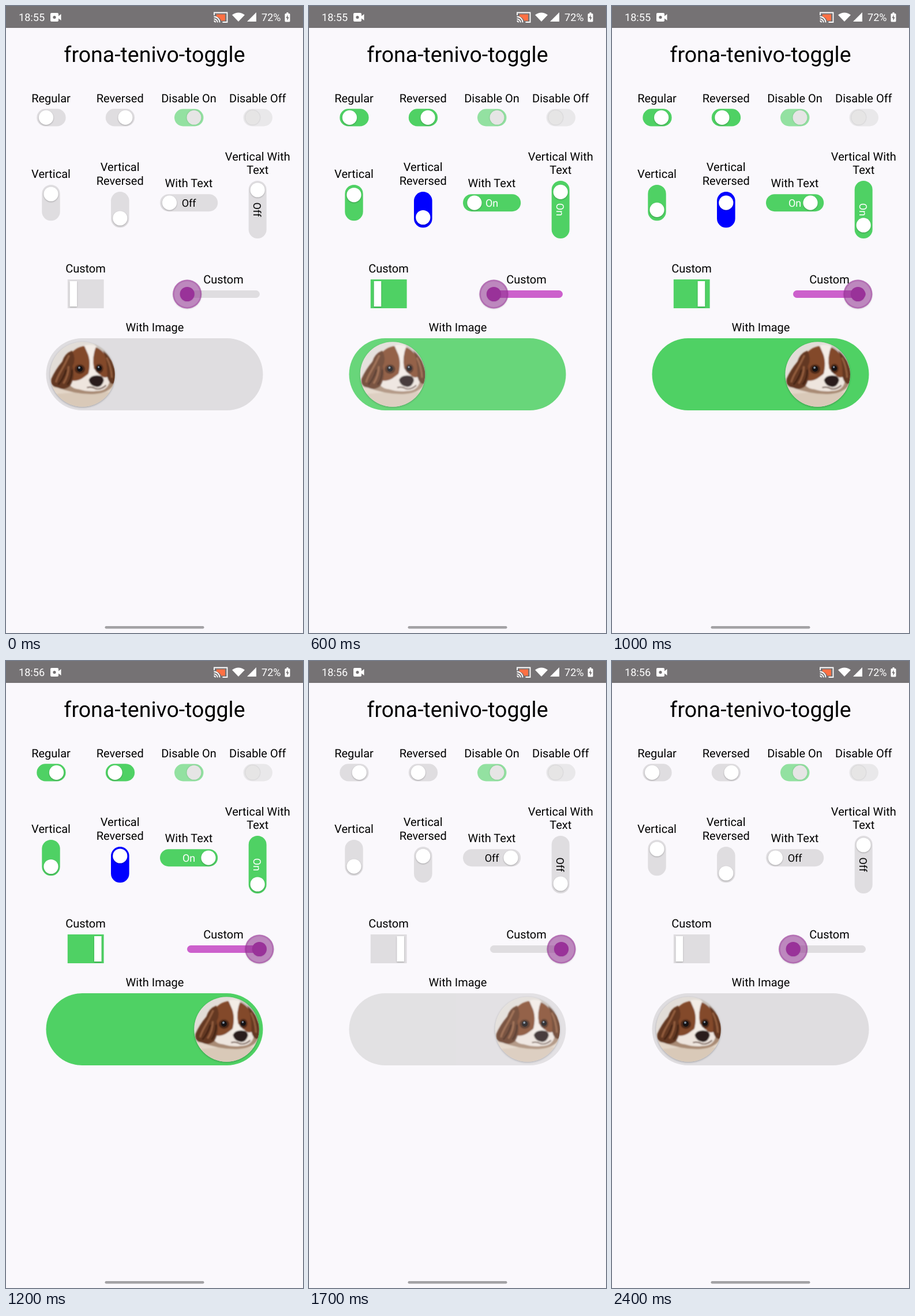
An HTML page for the animation above (3600 ms loop, 515 px wide and 1087 px high).

```html
<!DOCTYPE html>
<html lang="en">
<head>
<meta charset="utf-8">
<title>Switch gallery</title>
<style>
html, body { margin: 0; width: 100%; height: 100%; overflow: hidden; background: #faf8fc; }
svg { display: block; width: 100%; height: 100%; }
text { font: 20px Roboto, "Noto Sans", sans-serif; text-anchor: middle; text-rendering: geometricPrecision; }
.bar { font-size: 18.1px; fill: #fff; text-anchor: start; }
.state { font-size: 18px; }
.track { fill: var(--track); }
.thumb { fill: #fff; filter: drop-shadow(0 1px 1px #0004); }
.off { --track: #dfdde0; --slide: #dfdde0; --blue: #dfdde0; --ink: #000; }
.on { --track: #4fd164; --slide: #cc60cc; --blue: #00f; --ink: #fff; }
.state { fill: var(--ink); }
</style>
</head>
<body>
<svg id="stage" class="off" viewBox="0 0 515 1087">
  <defs>
    <clipPath id="round"><circle r="56.3"/></clipPath>
    <filter id="soft" x="-10%" y="-10%" width="120%" height="120%"><feGaussianBlur stdDeviation=".9"/></filter>
  </defs>

  <!-- status bar -->
  <rect width="515" height="38" fill="#757274"/>
  <text id="clock" class="bar" x="22" y="26"></text>
  <text class="bar" x="443" y="26">72%</text>
  <g fill="#fff">
    <path d="M79 12h10q2 0 2 2v3.500l4.500-3.500v11l-4.500-3.500v3.500q0 2-2 2h-10q-2 0-2-2v-11q0-2 2-2z"/>
    <circle cx="84" cy="19.500" r="2.600" fill="#757274"/>
    <path d="M392 15.500Q403 7.500 414 15.500L403 27z"/>
    <path d="M434 11v16h-16z"/>
    <path d="M485 13h1.500v-2h3v2h1.500q1.500 0 1.500 1.500v11.500q0 1.500-1.500 1.500h-6q-1.500 0-1.500-1.500v-11.500q0-1.500 1.500-1.500z"/>
    <path d="M488.500 15l-3 6h2v4.500l3.200-6h-2.200z" fill="#757274"/>
  </g>
  <path d="M365 14.500h15v11h-7q-2-6-8-7z" fill="#ff7043"/>
  <g fill="none" stroke="#fff" stroke-width="1.800">
    <path d="M361 16v-4.500h22.500v16.500h-8"/>
    <path d="M360.500 18.500a10 10 0 0 1 10 10M360.500 22.300a6.200 6.200 0 0 1 6.200 6.200"/>
    <path d="M360.500 26a2.500 2.500 0 0 1 2.500 2.500"/>
  </g>

  <text x="257.500" y="96.500" style="font-size:37.500px">frona-tenivo-toggle</text>
  <g id="labels"></g>
  <g id="switches"></g>

  <!-- disabled pair -->
  <rect x="292" y="178.500" width="50.500" height="30" rx="15" fill="#93e1a1"/>
  <rect x="411.500" y="178.500" width="50.500" height="30" rx="15" fill="#e9e8ea"/>
  <g fill="#e6e5e5" style="filter:drop-shadow(0 .5px .8px #0003)">
    <circle cx="326" cy="193.300" r="12.500"/><circle cx="427.700" cy="193.300" r="12.500"/>
  </g>

  <!-- slider -->
  <rect x="314" y="493" width="126" height="13" rx="6.500" fill="var(--slide)"/>
  <g id="knob" style="filter:drop-shadow(0 1px 1px #0003)">
    <circle r="25" fill="#993299" fill-opacity=".5"/>
    <circle r="23.700" fill="none" stroke="#993299" stroke-opacity=".3" stroke-width="2.600"/>
    <circle r="12.600" fill="#993299"/>
  </g>

  <!-- picture switch -->
  <g id="wide">
    <rect class="track" x="69.500" y="576" width="376" height="125" rx="62.500"/>
    <g id="photo" style="filter:drop-shadow(0 1.500px 1.500px #0004)">
      <g clip-path="url(#round)">
        <circle r="57" fill="#e2ddd8"/>
        <g filter="url(#soft)">
          <path d="M16-60h46v38l-30-14z" fill="#cbc4be"/>
          <path d="M-60 20Q0 12 60 16V60H-60z" fill="#e3d6c8"/>
          <path d="M-60 36Q0 28 60 32V60H-60z" fill="#d9c9b8"/>
          <!-- shadow under the chin, then white muzzle and cheeks -->
          <path d="M-46 22Q-10 36 22 34Q46 32 54 18L40 8H-30z" fill="#a98b74"/>
          <path d="M-26 4Q-26 24-6 26Q10 31 24 29Q43 29 47 13L36-8H-10z" fill="#eee5de"/>
          <!-- crown, eye patches and blaze -->
          <path d="M-24-30Q-14-47 4-49Q28-51 39-34Q49-16 45 4Q37 8 31 1L17-6L4 4Q-8 14-22 10z" fill="#83492c"/>
          <path d="M3-50Q14-53 24-49Q16-30 20-10L31 3L8 7Q16-16 10-34z" fill="#f3ece6"/>
          <!-- ears -->
          <path d="M-18-41Q-31-36-35-22Q-47-8-54 8Q-56 22-43 23Q-31 29-21 20Q-12 5-17-14Q-10-27-18-41z" fill="#643720"/>
          <path d="M36-41Q49-31 54-15Q62 4 55 17Q46 18 43 4Q44-20 36-41z" fill="#643720"/>
          <g fill="none" stroke="#96603f" stroke-width="3">
            <path d="M-23-33Q-30-18-37-6T-46 14M-24-14Q-24 2-33 16"/>
            <path d="M42-29Q50-14 51 6"/>
          </g>
          <path d="M-28-8Q-33 8-42 18M-18-8Q-18 8-26 18" fill="none" stroke="#3c2015" stroke-width="2.500"/>
          <path d="M8 23Q17 21 23 25Q33 27 41 19" fill="none" stroke="#64483d" stroke-width="2"/>
          <ellipse cx="-4.500" cy="-9" rx="9" ry="8" fill="#482719"/>
          <ellipse cx="29" cy="-10" rx="7" ry="8" fill="#482719"/>
          <path d="M11 10Q14 2 25 2Q37 2 37 11Q34 22 25 22Q13 20 11 10z" fill="#2b1e1d"/>
        </g>
        <circle cx="-4.500" cy="-9.500" r="5" fill="#151214"/>
        <circle cx="29" cy="-10.500" r="4.500" fill="#151214"/>
        <circle cx="-5.500" cy="-11.500" r="2" fill="#818d9b"/>
        <circle cx="28" cy="-12.500" r="1.700" fill="#818d9b"/>
      </g>
    </g>
  </g>

  <rect x="171.500" y="1075" width="172" height="4.500" rx="2.200" fill="#a3a2a5"/>
</svg>
<script>
const $ = id => document.getElementById(id);
const svgNode = (parent, tag, attrs, text = '') => {
  const node = document.createElementNS('http://www.w3.org/2000/svg', tag);
  for (const key in attrs) node.setAttribute(key, attrs[key]);
  node.textContent = text;
  return parent.appendChild(node);
};

const labels = [
  ['Regular', 78, 166.5], ['Reversed', 197.7, 166.5], ['Disable On', 317, 166.5], ['Disable Off', 436.3, 166.5],
  ['Vertical', 78, 298], ['Vertical', 197.7, 286], ['Reversed', 197.7, 309.5], ['With Text', 317, 314],
  ['Vertical With', 436.3, 267.5], ['Text', 436.3, 291],
  ['Custom', 138, 462], ['Custom', 377, 481], ['With Image', 258, 564]
];
for (const [text, x, y] of labels) svgNode($('labels'), 'text', { x, y }, text);

// box: x, y, width, height; the thumb centre travels from `from` to `to`
const switches = [
  { box: [53.3, 178.3, 50.3, 30.2], from: 69.5, to: 87.5 },
  { box: [172.8, 178.3, 50.3, 30.2], from: 207, to: 189 },
  { box: [62.3, 310, 31.4, 62.3], from: 326, to: 356.5, vertical: true },
  { box: [182, 322, 31.6, 62.3], from: 368, to: 338, vertical: true, fill: 'var(--blue)' },
  { box: [267, 326.2, 100.2, 30], from: 283.5, to: 351, label: true },
  { box: [420.7, 303, 31, 100], from: 319, to: 387, vertical: true, label: true },
  { box: [106.8, 474, 62.8, 50], from: 116.8, to: 159.3, square: true }
];
for (const s of switches) {
  const [x, y, width, height] = s.box;
  const cx = x + width / 2, cy = y + height / 2;
  const track = svgNode($('switches'), 'rect',
    { class: 'track', x, y, width, height, rx: s.square ? 0 : Math.min(width, height) / 2 });
  if (s.fill) track.style.fill = s.fill;
  if (s.label) s.text = svgNode($('switches'), 'text', {
    class: 'state', y: s.vertical ? 7.5 : 6.7,
    transform: `translate(${cx} ${cy})` + (s.vertical ? ' rotate(90)' : '')
  });
  s.thumb = s.square
    ? svgNode($('switches'), 'rect', { class: 'thumb', x: -6.3, y: -22, width: 12.6, height: 44 })
    : svgNode($('switches'), 'circle', { class: 'thumb', r: 12.6 });
  s.place = p => {
    const at = s.from + (s.to - s.from) * p;
    s.thumb.setAttribute('transform', s.vertical ? `translate(${cx} ${at})` : `translate(${at} ${cy})`);
  };
}

// cubic-bezier(.42, 0, 1, 1)
function easeIn(x) {
  let low = 0, high = 1, s;
  for (let i = 0; i < 24; i++) {
    s = (low + high) / 2;
    const bx = 1.26 * s * (1 - s) ** 2 + 3 * s * s * (1 - s) + s ** 3;
    if (bx < x) low = s; else high = s;
  }
  return 3 * s * s - 2 * s ** 3;
}
function easeInOut(x) {
  x = Math.max(0, Math.min(1, x));
  return x < .5 ? easeIn(2 * x) / 2 : 1 - easeIn(2 - 2 * x) / 2;
}

function draw(now) {
  const t = Math.floor(now % 3600 / 100) * 100;
  const on = t >= 600 && t < 1700;
  const p = t < 600 ? 0 : on ? easeInOut((t - 523) / 593) : 1 - easeInOut((t - 1653) / 695);
  const age = t < 600 ? 1000 : t - (on ? 600 : 1700);

  $('stage').setAttribute('class', on ? 'on' : 'off');
  $('clock').textContent = t < 1200 ? '18:55' : '18:56';
  for (const s of switches) {
    s.place(p);
    if (s.text) s.text.textContent = on ? 'On' : 'Off';
  }
  $('knob').setAttribute('transform', `translate(${314.2 + 125.2 * p} 499.5)`);
  $('photo').setAttribute('transform', `translate(${132.5 + 250 * p} 638.5)`);
  // the pressed picture switch fades back to full strength
  $('wide').setAttribute('opacity', Math.min(1, .85 + age / 1200));
  requestAnimationFrame(draw);
}
draw(performance.now());
</script>
</body>
</html>
```
